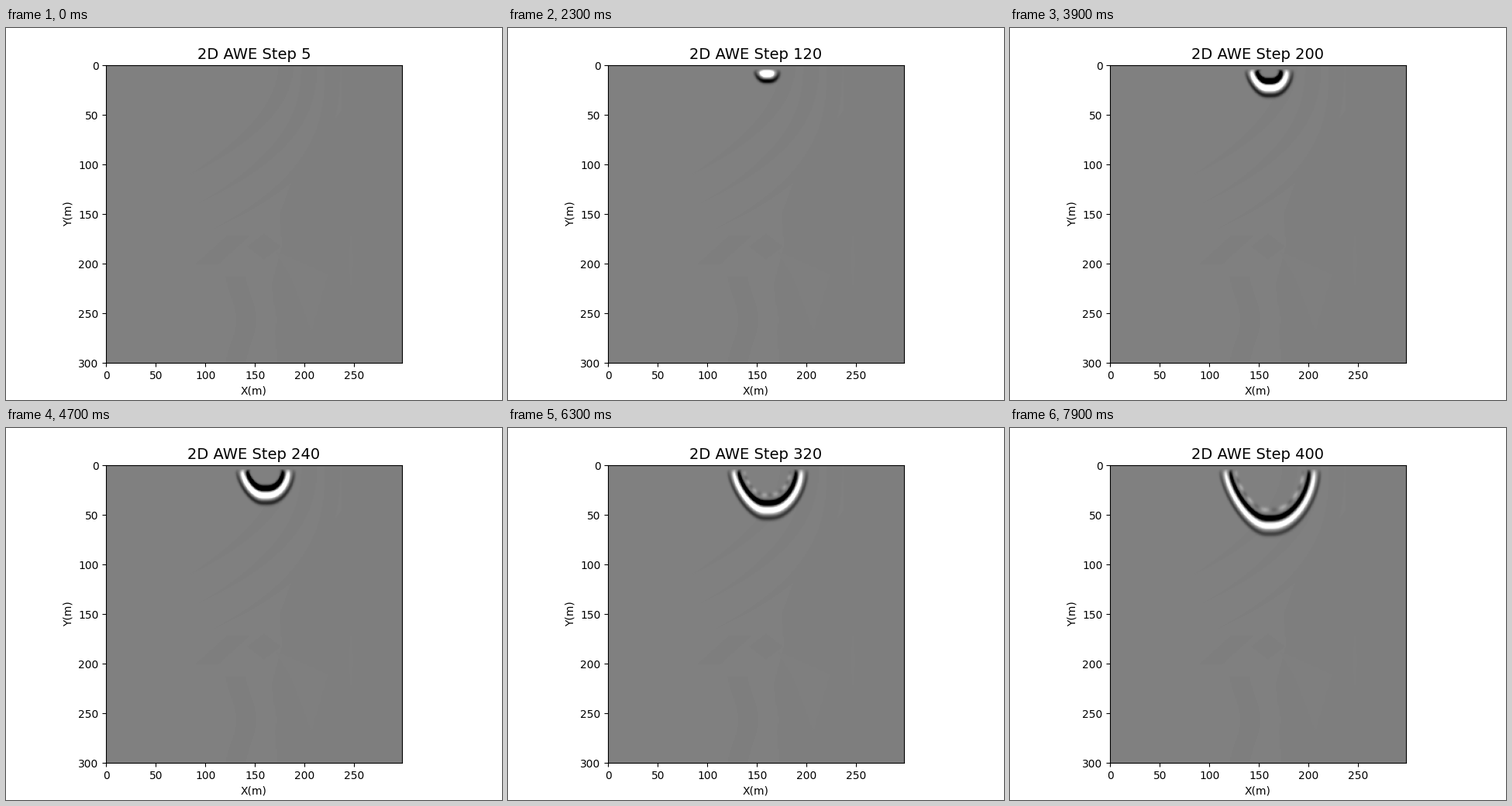
A matplotlib script for the animation above (8 s loop, 640 by 480 pixels).

```python
import numpy as np
import matplotlib.pyplot as plt
from matplotlib.animation import FuncAnimation

FRAMES, INTERVAL, STRIDE = 80, 100, 5
NX, NY = 298, 300
SCALE = 1.28                    # stage pixels per metre
LEFT, TOP = 320 - NX * SCALE / 2, 48
SRC_X, SRC_Y = 334, 57          # shot position in stage pixels
BASE, DARK, LIGHT = 128, 126, 127

X, Y = np.meshgrid(LEFT + SCALE * (np.arange(NX) + 0.5),
                   TOP + SCALE * (np.arange(NY) + 0.5))


def bump(v, center, width):
    return np.exp(-((v - center) / width) ** 2)


def ramp(v, center, width):
    return 1 / (1 + np.exp(-(v - center) / width))


def strip(center, half, y0, y1):
    """Cells within half a width of a line that runs from y0 to y1."""
    return (np.abs(X - center) < half) & (Y >= y0) & (Y <= y1)


def velocity_model():
    """Faint gray levels of the geological layers."""
    level = np.full(X.shape, BASE)

    # Layers that fall from the surface and bend to a tip on the left.
    for k in range(3):
        tip_x, tip_y = 236 + 13 * k, 190 + 36 * k
        u = (Y - TOP) / (tip_y - TOP)
        center = 361 + 30 * k - (125 + 17 * k) * u ** (2 + 0.4 * k)
        level[strip(center, 10 * (1 - u ** 4), TOP, tip_y)] = DARK

    # Slower block on the right.
    edge = np.interp(Y, [48, 106, 180, 240, 280, 330, 432],
                     [432, 433, 375, 353, 356, 343, 350])
    level[X > edge] = DARK

    # Wedge, folded beds and small lenses in the lower half.
    wedge = np.interp(Y, [288, 318, 391], [348, 415, 394])
    left_side = np.interp(Y, [288, 320, 391], [347, 367, 394])
    level[(X > left_side) & (X < wedge) & (Y > 288) & (Y < 391)] = LIGHT
    fold = 303 + 7 * np.sin((Y - 345) / 20)
    level[strip(fold, 13, 321, 432)] = DARK
    level[strip(fold + 27, 12, 330, 432)] = BASE
    level[strip(333, 22 - 1.3 * np.abs(Y - 282), 265, 299)] = DARK
    level[strip(280 - 1.1 * (Y - 286), 15, 268, 305)] = DARK
    level[strip(445, 3 - np.abs(Y - 300) / 12, 268, 332)] = LIGHT
    return (level + 0.5) / 128 - 1


# Arrival time: slow sideways, faster with depth, flat under the shot.
dx, dz = X - SRC_X, Y - SRC_Y
west = dx < 0
ACC, FLAT = 5.5e-5, 9
side = (np.hypot(dx, FLAT) - FLAT) / np.where(west, 0.163, 0.172)
down = (np.sqrt(0.222 ** 2 + 4 * ACC * np.maximum(dz, 0)) - 0.222) / (2 * ACC)
rise = np.where(dz < 0, -dz / 0.184, down)
power = np.where(west, 1.5, 1.8)
arrival = 41 + (side ** power + rise ** power) ** (1 / power)

radius = np.hypot(dx, dz)
angle = np.arctan2(dx, dz)
depth = (Y - TOP) / SCALE
surface = 1 - np.exp(-np.maximum(depth - 4, 0) / 4)
downward = np.clip(dz / (radius + 1), 0, 1)
gain = np.sqrt(83 / (radius + 4)) * (0.62 + 0.38 * downward) * surface
model = velocity_model()


def wave(t):
    tau = t - arrival
    pulse = (-0.5 * bump(tau, 27, 13)
             + 1.6 * bump(tau, 68, 15)
             - 1.8 * bump(tau, 107, 13))
    shot = bump(dx, 0, 6.5) * bump(dz, 0, 4.5) * bump(t, 80, 13)
    echo = bump(tau, 150, 13) * (0.08 + 0.25 * np.cos(13 * (angle - 0.38)))
    return gain * pulse - 3 * shot * (depth > 4) + echo * surface * ramp(t, 300, 12)


fig = plt.figure(figsize=(6.4, 4.8), dpi=100)
ax = fig.add_axes([0.1, 0.1, 0.8, 0.8])
image = ax.imshow(model, cmap="gray", vmin=-1, vmax=1, extent=[0, NX, NY, 0])
ax.set_xlabel("X(m)")
ax.set_ylabel("Y(m)")
title = ax.set_title("2D AWE Step 5", fontsize=14)


def update(i):
    step = STRIDE * (i + 1)
    image.set_data(np.clip(model + wave(step), -1, 1))
    title.set_text(f"2D AWE Step {step}")
    return image, title


anim = FuncAnimation(fig, update, frames=FRAMES, interval=INTERVAL,
                     repeat=True, repeat_delay=0, blit=False)
plt.show()
```
